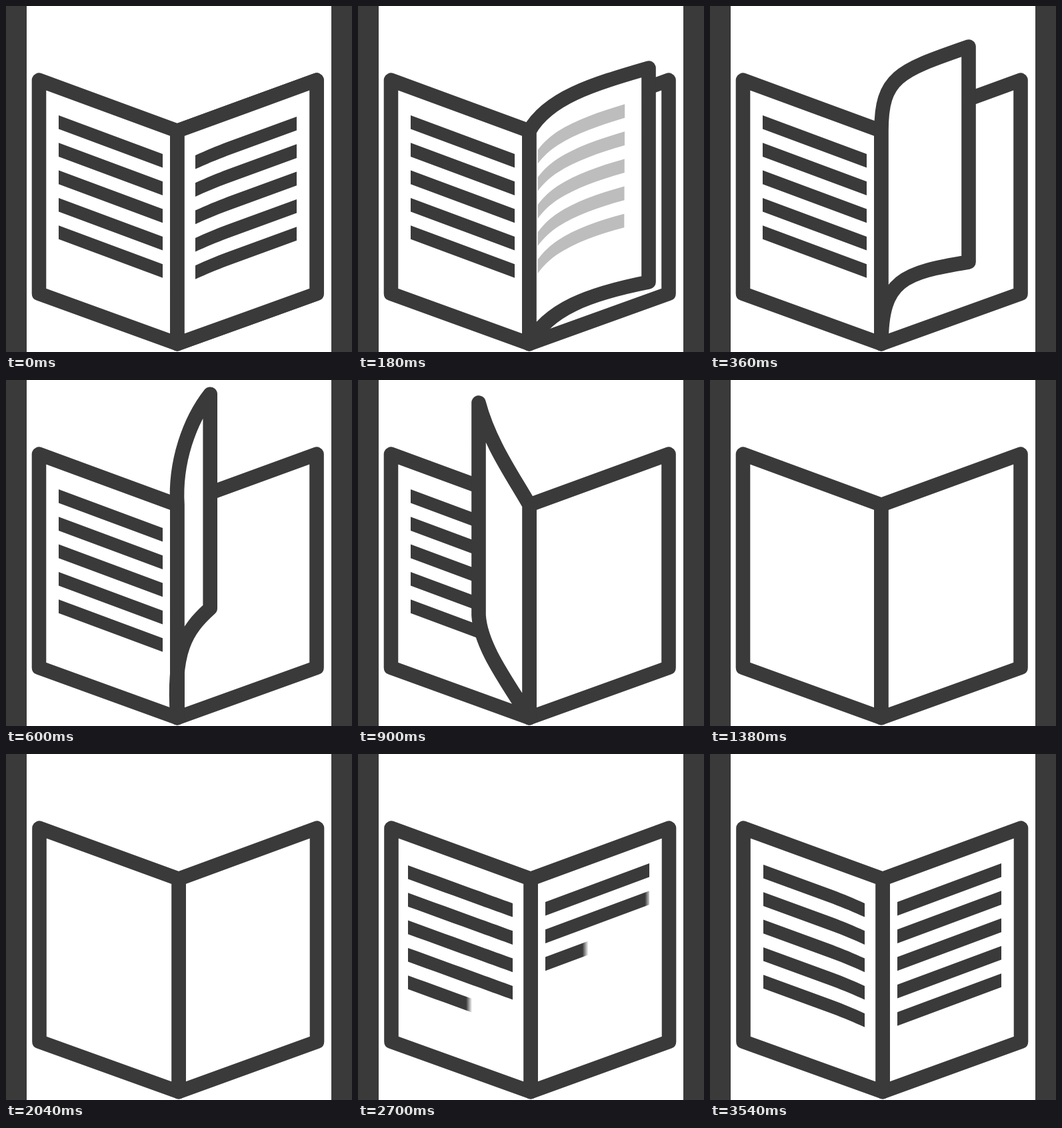
An HTML page with a canvas that plays this animation: 519x519 px, repeating every 3.6 s.

```html
<!DOCTYPE html>
<html lang="en">
<head>
<meta charset="utf-8">
<title>Book</title>
<style>
html, body { margin: 0; width: 100%; height: 100%; overflow: hidden; background: #fff; }
canvas { display: block; width: 519px; height: 519px; }
</style>
</head>
<body>
<canvas id="stage" width="519" height="519"></canvas>
<script>
const ctx = document.getElementById('stage').getContext('2d');
const LOOP = 3600, STEP = 60;
const LANDED = 1380, MIRROR = 2040, MIRROR_SUM = 516;
const INK = '#3a3a3a', CLEAR = 'rgba(58,58,58,0)', PAPER = '#fff';
const TOP = [257, 187.3], BOTTOM = [257, 506.7];
const ROWS = 5, ROW_GAP = 41.3, BAR = 20.6, SOFT = 9;

// time, free edge x, its top and bottom, two top handles, two bottom handles
const POSES = [
  [0,    466, 111.2, 431.4, 327, 162, 396, 136.5, 327, 481.6, 396, 456.5],
  [180,  436,  93, 414, 285, 138, 350, 118, 285, 455, 345, 432],
  [360,  388,  61, 384, 257, 105, 285,  97, 257, 410, 290, 400],
  [540,  330,  30, 352, 255, 118, 284,  62, 253, 398, 281, 374],
  [720,  255,  11, 331, 247, 134, 249,  68, 240, 430, 240, 386],
  [900,  181,  34, 353, 235, 148, 197,  95, 222, 450, 184, 400],
  [1080, 137,  59, 381, 216, 155, 161, 108, 208, 460, 148, 421],
  [1380, 49.5, 111.2, 431.4, 188, 162, 118, 136.5, 188, 481.6, 118, 456.5]
];

const clamp = v => Math.max(0, Math.min(1, v));

function slope(i, k) {
  if (i === 0) return 0;
  const a = POSES[i - 1], b = POSES[Math.min(i + 1, POSES.length - 1)];
  return (b[k] - a[k]) / (b[0] - a[0]);
}

// smooth pose between the keys
function poseAt(t) {
  let i = 0;
  while (i < POSES.length - 2 && t > POSES[i + 1][0]) i++;
  const a = POSES[i], b = POSES[i + 1], span = b[0] - a[0];
  const s = clamp((t - a[0]) / span), s2 = s * s, s3 = s2 * s;
  const v = a.map((p, k) =>
    (2 * s3 - 3 * s2 + 1) * p + (s3 - 2 * s2 + s) * span * slope(i, k) +
    (3 * s2 - 2 * s3) * b[k] + (s3 - s2) * span * slope(i + 1, k));
  return {
    top: [TOP, [v[4], v[5]], [v[6], v[7]], [v[1], v[2]]],
    bottom: [BOTTOM, [v[8], v[9]], [v[10], v[11]], [v[1], v[3]]]
  };
}

function bezier(p, u) {
  const w = 1 - u;
  return [0, 1].map(k => w * w * w * p[0][k] + 3 * w * w * u * p[1][k] +
    3 * w * u * u * p[2][k] + u * u * u * p[3][k]);
}

function onPage(pose, u, v) {
  const a = bezier(pose.top, u), b = bezier(pose.bottom, u);
  return [a[0] + (b[0] - a[0]) * v, a[1] + (b[1] - a[1]) * v];
}

function outline(path) {
  ctx.beginPath();
  path();
  ctx.closePath();
  ctx.fillStyle = PAPER;
  ctx.fill();
  ctx.strokeStyle = INK;
  ctx.lineWidth = 21.6;
  ctx.lineJoin = 'round';
  ctx.stroke();
}

function drawBook() {
  for (const x of [49.5, 466]) {
    outline(() => {
      ctx.moveTo(...TOP);
      ctx.lineTo(x, 111.2);
      ctx.lineTo(x, 431.4);
      ctx.lineTo(...BOTTOM);
    });
  }
}

function drawPage(pose) {
  const [t0, t1, t2, t3] = pose.top, [b0, b1, b2, b3] = pose.bottom;
  outline(() => {
    ctx.moveTo(...t0);
    ctx.bezierCurveTo(...t1, ...t2, ...t3);
    ctx.lineTo(...b3);
    ctx.bezierCurveTo(...b2, ...b1, ...b0);
  });
}

// a bar from its upper edge points
function drawBar(points, fill) {
  ctx.beginPath();
  points.forEach(p => ctx.lineTo(p[0], p[1]));
  points.slice().reverse().forEach(p => ctx.lineTo(p[0], p[1] + BAR));
  ctx.closePath();
  ctx.fillStyle = fill;
  ctx.fill();
}

const flatBar = row => [[79, 164], [235, 222]].map(([x, y]) => [x, y + row * ROW_GAP]);

function bentBar(row, bend) {
  const dy = row * ROW_GAP, pts = [];
  const mid = [332, 206.6 - 2.6 * bend], ctl = [308, 215.3 - 2.3 * bend];
  for (let i = 0; i <= 8; i++) {
    const s = i / 8, r = 1 - s;
    pts.push([r * r * 284 + 2 * r * s * ctl[0] + s * s * mid[0],
              r * r * 224 + 2 * r * s * ctl[1] + s * s * mid[1] + dy]);
  }
  for (let i = 1; i <= 8; i++) {
    const s = i / 8;
    pts.push([mid[0] + (441 - 5 * bend - mid[0]) * s,
              mid[1] + (167 - bend - mid[1]) * s + dy]);
  }
  return pts;
}

// soft edge travelling from the high x end to the low one
function wipe(from, to, p) {
  if (p >= 1) return INK;
  const x = from + (to - SOFT - from) * p;
  const g = ctx.createLinearGradient(x + SOFT, 0, x, 0);
  g.addColorStop(0, INK);
  g.addColorStop(1, CLEAR);
  return g;
}

function drawTurn(t) {
  for (let r = 0; r < ROWS; r++) drawBar(flatBar(r), INK);
  const pose = poseAt(t), rest = poseAt(0);
  drawPage(pose);
  const alpha = clamp((240 - t) / 180);
  if (!alpha) return;
  ctx.globalAlpha = alpha;
  for (let r = 0; r < ROWS; r++) {
    drawBar(bentBar(r, 1).map(([x, y]) => {
      const u = (x - 257) / 209, v = 0.15 + r * 0.13;
      const a = onPage(rest, u, v), b = onPage(pose, u, v);
      return [x + b[0] - a[0], y + b[1] - a[1]];
    }), INK);
  }
  ctx.globalAlpha = 1;
}

function drawWriting(t) {
  const bend = clamp((t - 3140) / 400) ** 2;
  for (let r = 0; r < ROWS; r++) {
    const first = clamp((t - 2065 - r * 124) / 240);
    const second = clamp((t - 2318 - r * 142) / 250);
    if (first) drawBar(bentBar(r, bend), wipe(441, 284, first));
    if (second) drawBar(flatBar(r), wipe(235, 79, second));
  }
}

function draw(t) {
  ctx.setTransform(1, 0, 0, 1, 0, 0);
  ctx.fillStyle = PAPER;
  ctx.fillRect(0, 0, 519, 519);
  ctx.fillStyle = INK;
  ctx.fillRect(0, 0, 31, 519);
  ctx.fillRect(488, 0, 31, 519);
  if (t >= MIRROR) ctx.setTransform(-1, 0, 0, 1, MIRROR_SUM, 0);
  drawBook();
  if (t < LANDED) drawTurn(t);
  else if (t >= MIRROR) drawWriting(t);
}

const start = performance.now();
function tick() {
  const t = (performance.now() - start) % LOOP;
  draw(Math.floor(t / STEP) * STEP);
  requestAnimationFrame(tick);
}
tick();
</script>
</body>
</html>
```
